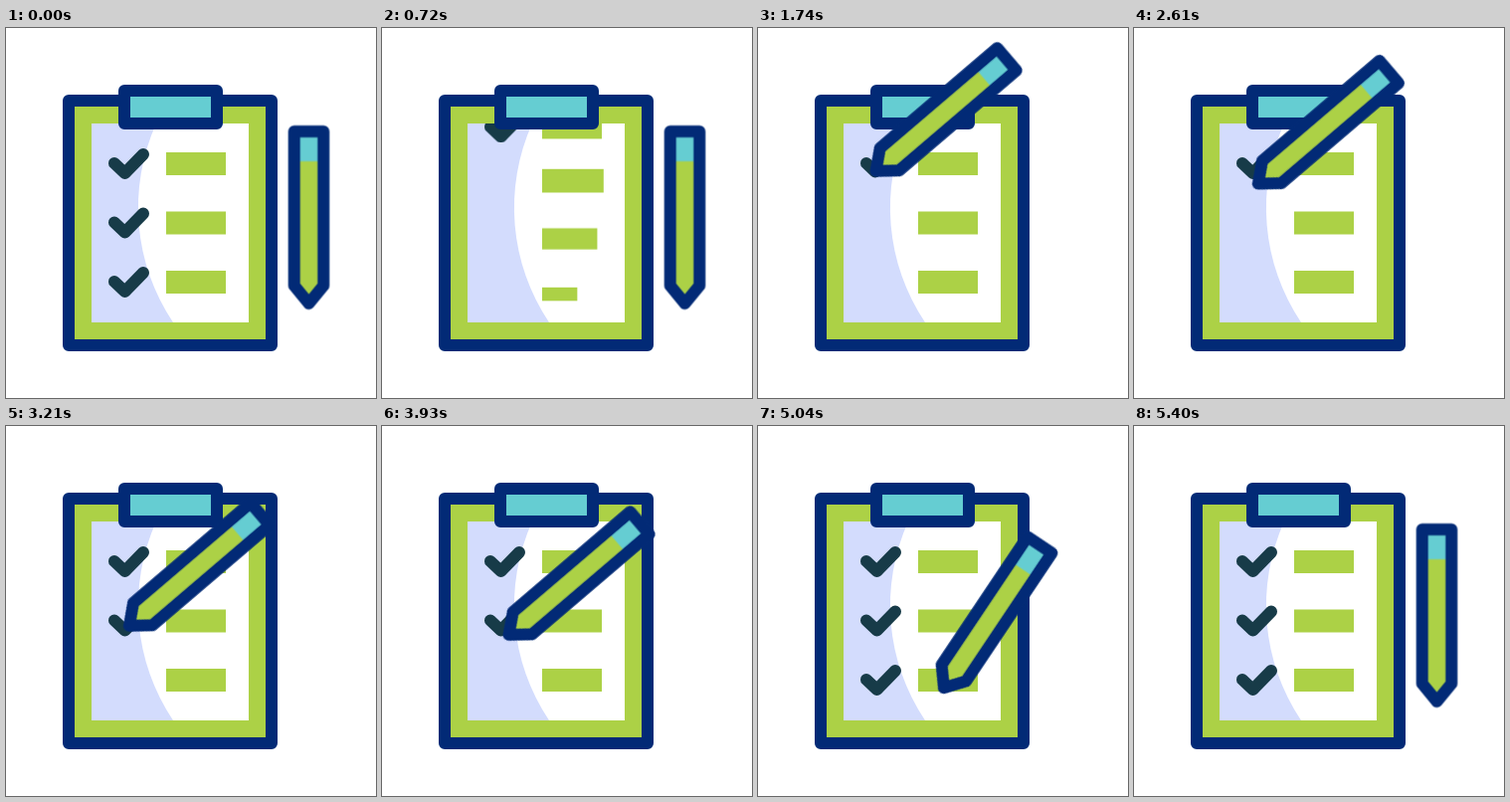
Recreate the animation shown at these times as an HTML page without scripts. Size 372x372 px, loop 5.43 s.

```html
<!DOCTYPE html>
<html lang="en">
<head>
<meta charset="utf-8">
<title>Checklist</title>
<style>
  html, body { margin: 0; height: 100%; overflow: hidden; background: #fff; }
  svg { display: block; width: 100%; height: 100%; }

  .outlined { stroke: #022a76; stroke-width: 12; stroke-linejoin: round; }
  .green { fill: #acd146; }
  .teal { fill: #65cdd2; }
  .check { fill: none; stroke: #173b48; stroke-width: 12; stroke-linecap: round; stroke-linejoin: round; }

  .done, .fresh, .pop, .draw, .pencil { animation: 5430ms linear infinite; }
  .done { animation-name: leave; }
  .fresh { animation-name: arrive; }
  .pop {
    transform-box: fill-box;
    transform-origin: 0 0;
    animation-name: pop;
    animation-delay: calc(var(--row) * 80ms - 5430ms);
  }
  .draw { stroke-dasharray: 100 110; }
  .draw1 { animation-name: draw1; }
  .draw2 { animation-name: draw2; }
  .draw3 { animation-name: draw3; }
  .pencil { animation-name: write; }

  @keyframes leave {
    0%, .55% { transform: none; animation-timing-function: ease-in-out; }
    17.5%, 100% { transform: translateY(-178.5px); }
  }
  @keyframes arrive {
    0%, .55% { transform: translateY(131px); animation-timing-function: ease-in-out; }
    17.5%, 100% { transform: none; }
  }
  @keyframes pop {
    0%, 8.84% { transform: scale(0); animation-timing-function: cubic-bezier(.15, .3, .5, 1); }
    13.26% { transform: scale(1.03); animation-timing-function: ease-in-out; }
    14.92%, 100% { transform: scale(1); }
  }

  /* Each tick: short leg, then long leg */
  @keyframes draw1 {
    0%, 29.56% { stroke-dashoffset: 101; }
    32.41% { stroke-dashoffset: 66; }
    38.12%, 100% { stroke-dashoffset: 0; }
  }
  @keyframes draw2 {
    0%, 54.97% { stroke-dashoffset: 101; }
    57.83% { stroke-dashoffset: 66; }
    63.54%, 100% { stroke-dashoffset: 0; }
  }
  @keyframes draw3 {
    0%, 80.39% { stroke-dashoffset: 101; }
    83.24% { stroke-dashoffset: 66; }
    88.95%, 100% { stroke-dashoffset: 0; }
  }

  @keyframes write {
    0%, 13.26% { transform: translate(304.5px, 190.5px) rotate(0deg); animation-timing-function: cubic-bezier(.4, 0, .75, .85); }
    20.99% { transform: translate(202px, 154px) rotate(49.5deg); animation-timing-function: cubic-bezier(.25, .4, .6, 1); }
    29.56% { transform: translate(173.8px, 78.8px) rotate(49.5deg); }
    32.41% { transform: translate(185.8px, 88.8px) rotate(49.5deg); }
    38.12%, 43.09% { transform: translate(202.8px, 72.8px) rotate(49.5deg); }
    43.09%, 68.51% { animation-timing-function: cubic-bezier(.35, .15, .6, 1); }
    54.97% { transform: translate(173.8px, 138.3px) rotate(49.5deg); }
    57.83% { transform: translate(185.8px, 148.3px) rotate(49.5deg); }
    63.54%, 68.51% { transform: translate(202.8px, 132.3px) rotate(49.5deg); }
    80.39% { transform: translate(173.8px, 197.8px) rotate(49.5deg); }
    83.24% { transform: translate(185.8px, 207.8px) rotate(49.5deg); }
    88.95% { transform: translate(202.8px, 191.8px) rotate(49.5deg); animation-timing-function: ease-in-out; }
    98.9%, 100% { transform: translate(304.5px, 190.5px) rotate(0deg); }
  }
</style>
</head>
<body>
<svg viewBox="0 0 372 372">
  <defs>
    <clipPath id="paper"><rect x="86" y="96" width="158" height="200"/></clipPath>
    <path id="tick" d="M109 136L119.5 146L138 127" pathLength="100"/>
    <rect id="bar" class="green" x="161" y="125" width="60" height="23"/>
    <g id="row">
      <use href="#tick" class="check"/>
      <use href="#bar"/>
    </g>
  </defs>

  <rect class="outlined green" x="63" y="73" width="204" height="246"/>
  <rect x="86" y="96" width="158" height="200" fill="#fff"/>
  <path d="M86 96H151A207 207 0 0 0 168 296H86Z" fill="#d3dcfd"/>

  <g clip-path="url(#paper)">
    <g class="done">
      <use href="#row"/>
      <use href="#row" y="59.5"/>
      <use href="#row" y="119"/>
    </g>
    <g class="fresh">
      <rect class="green pop" style="--row:0" x="161" y="125" width="60" height="23"/>
      <rect class="green pop" style="--row:1" x="161" y="184.5" width="60" height="23"/>
      <rect class="green pop" style="--row:2" x="161" y="244" width="60" height="23"/>
    </g>
    <use href="#tick" class="check draw draw1"/>
    <use href="#tick" class="check draw draw2" y="59.5"/>
    <use href="#tick" class="check draw draw3" y="119"/>
  </g>

  <rect class="outlined teal" x="119" y="63" width="93" height="33"/>

  <g class="pencil">
    <path class="green" d="M-14.75 -86.5H14.75V68.5L0 86.5L-14.75 68.5Z"/>
    <rect class="teal" x="-14.75" y="-86.5" width="29.5" height="30"/>
    <path class="outlined" fill="none" d="M-14.75 -86.5H14.75V68.5L0 86.5L-14.75 68.5Z"/>
  </g>
</svg>
</body>
</html>
```
